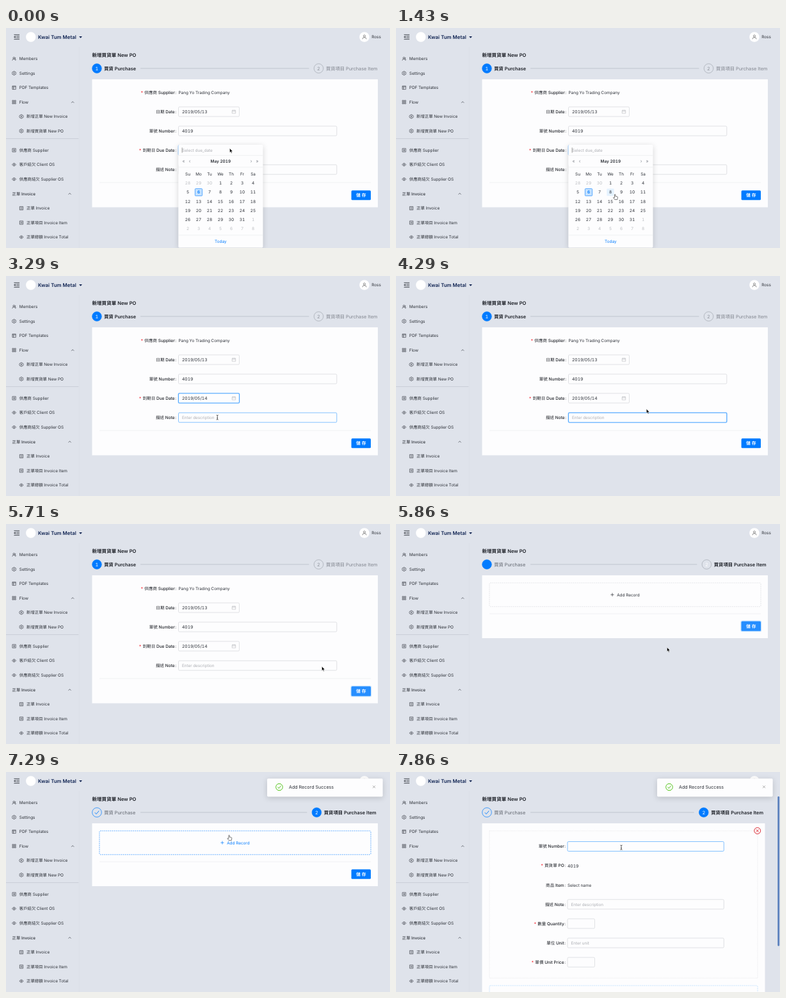
Animation, 600 px wide and 343 px high, one loop 8 s. Source, as an HTML page:

```html
<!DOCTYPE html>
<html lang="zh-Hant">
<head>
<meta charset="utf-8">
<title>New PO</title>
<style>
html, body { margin: 0; height: 100%; overflow: hidden; background: #dfe3eb; }
svg { display: block; width: 100vw; height: 100vh; }
text {
  font-family: Inter, "Noto Sans CJK TC", "Noto Sans CJK JP", "Noto Sans CJK", sans-serif;
  font-variant-numeric: tabular-nums;
  text-rendering: geometricPrecision;
  white-space: pre;
}
</style>
</head>
<body>
<svg id="stage" viewBox="0 0 600 343"></svg>
<script>
const BLUE = '#007bff', FOCUS = '#4fa8ff', INK = '#2b2f36', GREY = '#80858e', HINT = '#acaeb3', LINE = '#d3d5d9', PAPER = '#fdfdfe';
const LOOP = 8000, FPS = 7;
const stage = document.getElementById('stage');

const clamp = v => Math.max(0, Math.min(1, v));
const ramp = (t, from, to) => clamp((t - from) / (to - from));
const smooth = p => p * p * (3 - 2 * p);

// ---- drawing helpers (text is placed by its vertical centre) ----
const text = (x, y, str, { size = 6.4, fill = INK, weight = 400, anchor = 'start' } = {}) =>
  `<text x="${x}" y="${y + size * .36}" font-size="${size}" fill="${fill}" font-weight="${weight}" text-anchor="${anchor}">${str}</text>`;
const rect = (x, y, w, h, fill, extra = '') =>
  `<rect x="${x}" y="${y}" width="${w}" height="${h}" fill="${fill}" ${extra}/>`;
const circle = (x, y, r, fill, extra = '') => `<circle cx="${x}" cy="${y}" r="${r}" fill="${fill}" ${extra}/>`;
const path = (x, y, d, stroke = INK, width = .65, fill = 'none', scale = 1) =>
  `<path transform="translate(${x} ${y}) scale(${scale})" d="${d}" fill="${fill}" stroke="${stroke}" stroke-width="${width}" stroke-linejoin="round"/>`;
const hline = (x1, x2, y, stroke = '#e6e7ea', width = .6) => path(0, 0, `M${x1} ${y}H${x2}`, stroke, width);
const ring = r => `M${-r} 0a${r} ${r} 0 1 0 ${2 * r} 0a${r} ${r} 0 1 0 ${-2 * r} 0`;
const shadow = 'style="filter:drop-shadow(0 2px 4px rgba(0,0,0,.16))"';

const SQUARE = 'M-3-3H3V3H-3Z';
const ICONS = {
  team: 'M-1.9-1.4a1.5 1.5 0 1 0 3 0a1.5 1.5 0 1 0-3 0M-3.1 3Q-2.8.2-.4.2T2.2 3M1.6-2.8Q3.6-1.4 1.9.1Q3.1.8 3.3 2.4',
  gear: 'M-1-3.3H1L1.5-2.2 2.7-2.3 3.6-.7 2.9 0 3.6.7 2.7 2.3 1.5 2.2 1 3.3H-1L-1.5 2.2-2.7 2.3-3.6.7-2.9 0-3.6-.7-2.7-2.3-1.5-2.2Z' + ring(1.1),
  table: SQUARE + 'M-3-1.3H3M-1-1.3V3',
  apps: 'M-3-3H-.6V-.6H-3ZM.6-3H3V-.6H.6ZM-3 .6H-.6V3H-3ZM.6.6H3V3H.6Z',
  list: SQUARE + 'M-.4-1.3H1.5M-.4 0H1.5M-.4 1.3H1.5M-1.6-1.3h.6M-1.6 0h.6M-1.6 1.3h.6',
  eye: 'M-3.5 0Q0-5 3.5 0Q0 5-3.5 0Z' + ring(1.1),
};
const CHEVRON = 'M-2 1 0-1 2 1', CROSS = 'M-2-2 2 2M2-2-2 2', CALENDAR = 'M-2.7-2.1H2.7V2.6H-2.7ZM-2.7-.5H2.7M-1.3-3V-1.4M1.3-3V-1.4';

const MENU = [
  ['team', 'Members', 48], ['gear', 'Settings', 70.5], ['table', 'PDF Templates', 93], ['apps', 'Flow', 115.5],
  ['gear', '新增正單 New Invoice', 138, 1], ['gear', '新增買貨單 New PO', 160.5, 1],
  ['list', '供應商 Supplier', 190.5], ['eye', '客戶結欠 Client OS', 213], ['eye', '供應商結欠 Supplier OS', 235.7],
  ['list', '正單 Invoice', 281, 1], ['list', '正單項目 Invoice Item', 303.5, 1], ['eye', '正單總額 Invoice Total', 326, 1],
];

const frame =
  rect(0, 0, 600, 343, '#dfe3eb') +
  path(114.5, 30, 'M0 0V313', '#d8dce4', .6) +
  path(16.8, 14, 'M-4.3-3.6H4.3M-1-1.2H4.3M-1 1.2H4.3M-4.3 3.6H4.3M-4.3 0-2.4-1.6V1.6Z', INK, .8) +
  circle(38.8, 14, 7.7, '#fff') +
  text(50, 14, 'Kwai Tum Metal', { size: 7.8, weight: 600, fill: '#0d2150' }) +
  path(116.6, 14.2, 'M-2.4-1.3H2.4L0 1.5Z', 'none', 0, '#0d2150') +
  circle(560, 14, 7.8, '#fff') +
  path(560, 14, 'M-1.6-1.5a1.6 1.6 0 1 0 3.2 0a1.6 1.6 0 1 0-3.2 0M-3 3.4Q-2.8.4 0 .4T3 3.4', '#555', .65) +
  text(571.2, 14, 'Ross') +
  MENU.map(([icon, label, y, nested = 0]) =>
    path(12.6 + nested * 11.4, y, ICONS[icon], INK, .7, 'none', .88) + text(20.8 + nested * 11.2, y, label)).join('') +
  text(9.5, 258.3, '正單 Invoice', { weight: 500 }) +
  path(104.2, 115.7, CHEVRON) + path(99.6, 258.5, CHEVRON) +
  hline(0, 113.5, 172.5, '#c6cad2', .8) +
  text(134.5, 42.3, '新增買貨單 New PO', { size: 7.55, weight: 600, fill: '#1d2027' });

// ---- form parts ----
function label(right, y, str, required) {
  return `<text x="${right}" y="${y + 2.35}" font-size="6.55" font-weight="500" text-anchor="end" fill="#1f2228">` +
    (required ? '<tspan fill="#f5222d">* </tspan>' : '') + str + '\u200a:</text>';
}
function input(x, y, w, { value, hint, focus, hover, date } = {}) {
  return (focus ? rect(x - 1, y - 8.5, w + 2, 17, '#c3e0ff', 'rx="2.2"') : '') +
    rect(x, y - 7.5, w, 15, PAPER, `rx="1.6" stroke="${focus || hover ? FOCUS : LINE}" stroke-width="${focus ? 1.1 : .7}"`) +
    (value ? text(x + 5.5, y, value, { size: 6.7 }) : '') +
    (hint ? text(x + 5.5, y, hint, { size: 6.3, fill: HINT }) : '') +
    (date ? path(x + 86.5, y, CALENDAR, '#b0b2b6', .55) : '');
}
function saveButton(y, t) {
  const hover = ramp(t, 5000, 5150) * (1 - ramp(t, 5860, 6150));
  const wave = t >= 5350 ? 1 - ramp(t, 5860, 6300) : 0;
  return (wave ? rect(538.4, y - 8.7, 32.8, 17.4, '#9fd0ff', `rx="2.6" opacity="${.6 * wave}"`) : '') +
    rect(539.6, y - 7.5, 30.4, 15, BLUE, 'rx="1.6"') +
    rect(539.6, y - 7.5, 30.4, 15, '#fff', `rx="1.6" opacity="${.15 * hover}"`) +
    text(554.8, y, '儲 存', { size: 6.8, fill: '#fff', weight: 600, anchor: 'middle' });
}
function steps(t, second, cx) {
  const p = second ? ramp(t, 5860, 6140) : 0;
  const size = 7.3, on = { size, weight: 600, fill: '#1d2027' }, off = { size, fill: GREY };
  const digit = fill => ({ size: 7.4, fill, anchor: 'middle' });
  return circle(142, 63, 7.3, BLUE, `fill-opacity="${1 - p}" stroke="${BLUE}" stroke-width=".7"`) +
    (second ? path(142, 63, 'M-3.2.2-1 2.5 3.4-2.5', BLUE, .9) : text(142, 63, '1', digit('#fff'))) +
    text(153.3, 63, '買貨 Purchase', second ? { size, fill: '#5f646d' } : on) +
    hline(210, cx - 15, 63, '#b3b8c2', .7) +
    circle(cx, 63, 7.3, BLUE, `fill-opacity="${p}" stroke="${p > .5 ? BLUE : '#a3a8b1'}" stroke-width=".7"`) +
    text(cx, 63, '2', digit(second ? '#fff' : '#8f949d')) +
    text(cx + 11.4, 63, '買貨項目 Purchase Item', second ? on : off);
}

function datePicker([mx, my]) {
  const colX = c => 284 + c * 17, rowY = r => 242 + r * 14.1;
  const mid = { anchor: 'middle' };
  let out = rect(269.3, 182, 132.2, 160.5, PAPER, 'rx="1.8" ' + shadow) +
    text(275.3, 190.5, 'Select due_date', { fill: HINT, size: 6.3 }) + path(275.2, 186.5, 'M0 0V8', '#333', .5) +
    hline(269.3, 401.5, 198.7) + hline(269.3, 401.5, 217) + hline(269.3, 401.5, 323) +
    text(335.3, 207.8, 'May 2019', { weight: 600, ...mid }) +
    [[277.5, '«'], [287, '‹'], [383, '›'], [392.5, '»']].map(([x, s]) => text(x, 207.4, s, { fill: GREY, size: 7, ...mid })).join('') +
    text(335.3, 333, 'Today', { fill: BLUE, ...mid });
  const hoverCol = Math.round((mx - 284) / 17), hoverRow = Math.round((my - 242) / 14.1);
  ['Su', 'Mo', 'Tu', 'We', 'Th', 'Fr', 'Sa'].forEach((d, c) => out += text(colX(c), 228, d, mid));
  for (let i = 0; i < 42; i++) {
    const c = i % 7, r = Math.floor(i / 7), n = i - 2, x = colX(c), y = rowY(r);
    const today = n === 6, inMonth = n > 0 && n < 32;
    if (today) out += rect(x - 5.6, y - 5.6, 11.2, 11.2, '#c5e2ff', `rx="1" stroke="${BLUE}" stroke-width=".6"`);
    else if (c === hoverCol && r === hoverRow) out += rect(x - 5.6, y - 5.6, 11.2, 11.2, '#e4f2ff', 'rx="1"');
    out += text(x, y, n < 1 ? n + 30 : n > 31 ? n - 31 : n,
      { ...mid, size: 6.5, fill: today ? BLUE : inMonth ? INK : '#bcbec2', weight: today ? 600 : 400 });
  }
  return out;
}

// ---- scenes ----
function purchaseForm(t, mouse) {
  const open = t < 2280, noteFocus = t >= 3500 && t < 5350;
  return steps(t, false, 488.5) + rect(134.5, 80, 446.5, 199.5, PAPER) +
    label(266, 100.5, '供應商 Supplier', true) + text(269.5, 100.5, 'Pang Yo Trading Company') +
    label(266, 130.5, '日期 Date') + input(269.5, 130.5, 95, { value: '2019/05/13', date: true }) +
    label(266, 160.5, '單號 Number') + input(269.5, 160.5, 247.3, { value: '4019' }) +
    label(266, 190.5, '到期日 Due Date', true) +
    input(269.5, 190.5, 95, { value: open ? '' : '2019/05/14', date: true, focus: t < 3500 }) +
    label(266, 220.7, '描述 Note') +
    input(269.5, 220.7, 247.3, { hint: 'Enter description', focus: noteFocus, hover: t > 3000 && t < 3500 }) +
    hline(146, 570, 241) + saveButton(260.8, t) + (open ? datePicker(mouse) : '');
}

function itemList(t, [, my]) {
  const hover = my < 129, color = hover ? BLUE : INK;
  return steps(t, true, 485.4) + rect(134.5, 80, 446.5, 98, PAPER) +
    rect(146, 91.8, 424, 37, PAPER, `rx="1.6" stroke="${hover ? BLUE : LINE}" stroke-width=".7" stroke-dasharray="1.6 1.4"`) +
    path(338, 110.2, 'M-2.6 0H2.6M0-2.6V2.6', color, .7) + text(345.2, 110.2, 'Add Record', { fill: color }) +
    hline(146, 570, 140) + saveButton(159.3, t);
}

function itemForm(t, [, my]) {
  const wide = 244.3, small = 42.5;
  const rows = [
    ['單號 Number', 0, y => input(268, y, wide, { hover: my > 107 })],
    ['買貨單 PO', 1, y => text(268, y, '4019', { size: 6.7 })],
    ['商品 Item', 0, y => text(268, y, 'Select name')],
    ['描述 Note', 0, y => input(268, y, wide, { hint: 'Enter description' })],
    ['數量 Quantity', 1, y => input(268, y, small)],
    ['單位 Unit', 0, y => input(268, y, wide, { hint: 'Enter unit' })],
    ['單價 Unit Price', 1, y => input(268, y, small)],
  ];
  return steps(t, true, 480.8) + rect(134.5, 80, 442, 263, PAPER) +
    rect(146, 91.8, 419, 229.5, 'none', 'stroke="#dfe0e3" stroke-width=".6" stroke-dasharray="1.2 1"') +
    rows.map(([name, required, field], i) => {
      const y = 116 + i * 30.1;
      return label(265, y, name, required) + field(y);
    }).join('') +
    circle(564.7, 91.6, 4.9, '#fff', 'stroke="#d9232e" stroke-width="1"') + path(564.7, 91.6, CROSS, '#d9232e', 1) +
    rect(146, 333, 419, 37, PAPER, 'rx="1.6" stroke="#9fd0ff" stroke-width=".7" stroke-dasharray="1.6 1.4"') +
    rect(596.3, 38, 2.8, 233.5, '#5a80bd', 'rx="1.4"');
}

function notice(t) {
  const p = smooth(ramp(t, 5930, 6200));
  return p ? `<g opacity="${p}" transform="translate(${(1 - p) * 190} 0)">` +
    rect(408, 10.3, 180.7, 28.3, PAPER, 'rx="1.8" ' + shadow) +
    circle(427, 23.5, 5.3, 'none', 'stroke="#52c41a" stroke-width="1"') +
    path(427, 23.5, 'M-2.4 0-.6 2 2.5-2', '#52c41a', 1) +
    text(442, 23.6, 'Add Record Success', { size: 7.15 }) + path(575, 23.2, CROSS, '#888', .65) + '</g>' : '';
}

// ---- mouse ----
const TRACK = [
  [0, 349.5, 187.5], [710, 341, 238], [1000, 341, 238], [1300, 348, 256], [1720, 322, 270], [2000, 320.5, 267],
  [2285, 321, 265.3], [2570, 321, 265.3], [3140, 330, 221], [3570, 331, 219], [4285, 391.3, 207.3],
  [5100, 551, 260], [5430, 552, 261], [5571, 549, 259], [5714, 493.5, 222], [5857, 423.5, 192.3],
  [6290, 348.6, 98.3], [7430, 348.6, 98.3], [7857, 352, 117.7],
];
const SHAPES = [[0, 'arrow'], [430, 'hand'], [2280, 'arrow'], [3000, 'beam'], [3950, 'arrow'], [5000, 'hand'],
  [5700, 'arrow'], [6140, 'hand'], [7700, 'beam']];

function mouseAt(t) {
  const i = TRACK.findIndex(k => k[0] > t);
  if (i < 0) return TRACK[TRACK.length - 1].slice(1);
  const [t0, x0, y0] = TRACK[i - 1], [t1, x1, y1] = TRACK[i];
  const p = smooth(ramp(t, t0, t1));
  return [x0 + (x1 - x0) * p, y0 + (y1 - y0) * p];
}
function pointer(t, [x, y]) {
  const shape = SHAPES.filter(s => s[0] <= t).pop()[1];
  if (shape === 'arrow') return path(x, y, 'M0 0V6.7L1.5 5.3 2.6 7.8 3.7 7.3 2.6 4.9H4.7Z', '#fff', .5, '#000');
  if (shape === 'beam') return path(x, y, 'M-1.6-3.6Q0-3.6 0-2.6Q0-3.6 1.6-3.6M0-2.8V2.8M-1.6 3.6Q0 3.6 0 2.6Q0 3.6 1.6 3.6M-.8.9H.8', '#222', .7);
  return path(x, y, 'M-.7.6Q0-.4.7.6V3.2L3.6 3.8Q4.4 4 4.2 5L3.6 8.4H-.4L-2.6 5.4Q-2.4 4.2-.7 5.4Z', '#222', .6, '#fff');
}

function draw(t) {
  const mouse = mouseAt(t);
  const scene = t < 5850 ? purchaseForm : t < 7560 ? itemList : itemForm;
  stage.innerHTML = frame + scene(t, mouse) + notice(t) + pointer(t, mouse);
}

// The picture advances in even steps, like a screen capture.
let shown = -1;
function tick() {
  const step = Math.floor((performance.now() % LOOP + 5) * FPS / 1000) % (LOOP * FPS / 1000);
  if (step !== shown) draw((shown = step) * 1000 / FPS);
  requestAnimationFrame(tick);
}
tick();
</script>
</body>
</html>
```
